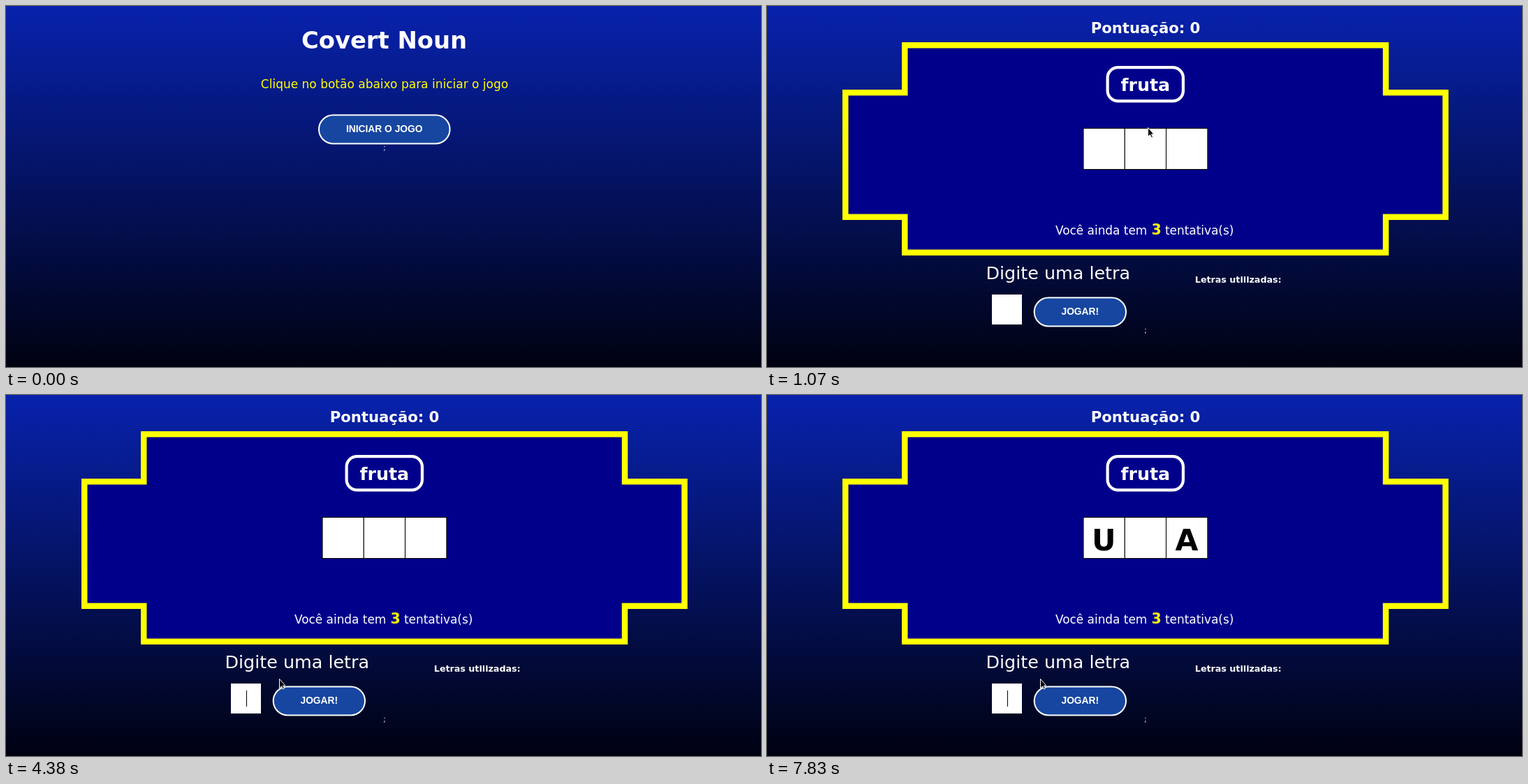
Recreate the animation shown at these times as an HTML page. Size 1081 by 518 pixels, loop 8 s.

```html
<!DOCTYPE html>
<html lang="pt">
<head>
<meta charset="utf-8">
<title>Covert Noun</title>
<style>
  html, body { margin: 0; width: 100%; height: 100%; overflow: hidden; background: #000211; }
  svg { display: block; font-family: "DejaVu Sans", Verdana, sans-serif; fill: #fff; }
  .bold { font-weight: bold; }
  .mid { text-anchor: middle; }
  .yellow { fill: #ff0; }
  .button rect { fill: #1646a0; stroke: #fff; stroke-width: 2; }
  .button text { font: bold 13.8px "Liberation Sans", Arial, sans-serif; text-anchor: middle; }
  .cells rect { stroke: #000; stroke-width: 1.1; }
  .cells text { font-size: 42.5px; fill: #000; }
  #ibeam { mix-blend-mode: difference; fill: none; stroke: #fff; }
</style>
</head>
<body>
<svg width="1081" height="518" viewBox="0 0 1081 518">
  <defs>
    <linearGradient id="sky" x2="0" y2="1">
      <stop stop-color="#0822ad"/>
      <stop offset="1" stop-color="#000211"/>
    </linearGradient>
  </defs>
  <rect width="1081" height="518" fill="url(#sky)"/>

  <g id="start">
    <text class="bold mid" x="541.5" y="61" font-size="33.8">Covert Noun</text>
    <text class="yellow mid" x="542" y="118" font-size="17">Clique no botão abaixo para iniciar o jogo</text>
    <g class="button">
      <rect id="startButton" x="448" y="156.5" width="187.5" height="41" rx="20.5"/>
      <text x="541.7" y="181">INICIAR O JOGO</text>
    </g>
    <text class="mid" x="542" y="207" font-size="10">;</text>
  </g>

  <g id="game">
    <text class="bold mid" x="542" y="39" font-size="21.2">Pontuação: 0</text>
    <path d="M197.25 56.25H886V124.25H971.5V302.75H886V353.75H197.25V302.75H112.25V124.25H197.25Z"
      fill="#00008b" stroke="#ff0" stroke-width="8.5"/>
    <rect x="487.6" y="88.1" width="108.3" height="48.3" rx="15" fill="none" stroke="#fff" stroke-width="4.2"/>
    <text class="bold mid" x="541.8" y="122" font-size="25.3">fruta</text>
    <g class="cells bold mid">
      <rect x="453" y="175.5" width="59.4" height="59"/>
      <rect x="512.2" y="175.5" width="59.4" height="59"/>
      <rect x="571.5" y="175.5" width="59.4" height="59"/>
      <text id="first" x="482.3" y="222.5">U</text>
      <text id="last" x="601" y="222.5">A</text>
    </g>
    <text x="413" y="328" font-size="16.9">Você ainda tem</text>
    <text class="bold yellow mid" x="557.7" y="328" font-size="20.4">3</text>
    <text x="570" y="328" font-size="16.9">tentativa(s)</text>
    <text x="313.5" y="392" font-size="25.4">Digite uma letra</text>
    <text class="bold" x="612.8" y="396.5" font-size="12.7">Letras utilizadas:</text>
    <rect x="322" y="414" width="43" height="43"/>
    <text id="typed" class="mid" x="344" y="443" font-size="20.8" fill="#000"
      font-family="Liberation Sans, Arial, sans-serif"></text>
    <rect id="caret" y="424" width="1" height="23" fill="#000"/>
    <g class="button">
      <rect x="382.7" y="418.5" width="131.3" height="41" rx="20.5"/>
      <text x="448.3" y="443">JOGAR!</text>
    </g>
    <text class="mid" x="542" y="469" font-size="10">;</text>
  </g>

  <g id="pointer">
    <circle id="press" r="10.5" fill="#ff0" opacity=".5"/>
    <path id="arrow" d="M.5 .5V13.5L3.5 10.8L5.5 15L7.5 14.2L5.5 10H9Z" fill="#000" stroke="#fff"/>
    <path id="hand" d="M0 1Q1.5-1 3 1V7Q5 6 6 8Q8 7 8.5 9Q10.5 8.5 10 12L9 16V19H1V17L-3 11.5Q-4 8.5 0 11Z" stroke="#000" stroke-width=".8"/>
    <path id="ibeam" d="M-3-6.5H-1L.5-5.5L2-6.5H4M.5-5.5V5.5M-3 6.5H-1L.5 5.5L2 6.5H4"/>
  </g>
</svg>
<script>
const LOOP = 8000, STEP = 68;
const get = id => document.getElementById(id);
const show = (id, on) => get(id).style.display = on ? "" : "none";
const within = (t, ...spans) => spans.some(([a, b]) => t >= a && t < b);
const clamp = v => Math.max(0, Math.min(1, v));
const ease = s => s * s * (3 - 2 * s);

// start time, step count, then start, control and end point of a curve
const moves = [
  [70, 10, 1026, 507, 800, 345, 545, 174],
  [1340, 8, 545, 174, 592, 208, 639, 228],
  [2490, 9, 639, 228, 148, 400, 351, 436],
  [3170, 1, 351, 436, 349, 437, 346, 437],
  [3380, 4, 346, 437, 362, 425, 391, 407]
];

function pointerAt(t) {
  const [start, count, x0, y0, cx, cy, x1, y1] = moves.findLast(m => m[0] <= t) || moves[0];
  const s = ease(clamp((Math.floor((t - start) / STEP) + 1) / count));
  const curve = (a, b, c) => (1 - s) ** 2 * a + 2 * s * (1 - s) * b + s * s * c;
  return [curve(x0, cx, x1), curve(y0, cy, y1)];
}

function draw(t) {
  const playing = t >= 1070;
  show("start", !playing);
  show("game", playing);

  const hover = ease(clamp((t - 546) / 264));
  const mix = (a, b) => Math.round(a + (b - a) * hover);
  get("startButton").style.fill = `rgb(${mix(22, 9)},${mix(70, 34)},${mix(160, 178)})`;

  const letter = within(t, [5370, 5900]) ? "U" : within(t, [6770, 7300]) ? "A" : "";
  get("typed").textContent = letter;
  get("caret").setAttribute("x", { U: 351, A: 350 }[letter] || 344);
  show("caret", within(t, [3310, 3850], [4380, 4920], [5370, 5840], [6440, 7240], [7830, LOOP]));
  show("first", t >= 5900);
  show("last", t >= 7300);

  const [x, y] = pointerAt(t);
  const inside = (l, r, top, bottom) => x > l && x < r && y > top && y < bottom;
  const onButton = !playing && inside(447, 636, 155, 198);
  const onText = playing && (inside(322, 365, 414, 457) || inside(316, 522, 368, 398));
  get("pointer").setAttribute("transform", `translate(${x} ${y})`);
  show("pointer", t >= 70);
  show("press", within(t, [880, 1070], [3240, 3380]));
  show("hand", onButton);
  show("ibeam", onText);
  show("arrow", !onButton && !onText);
}

const origin = performance.now();
function tick() {
  draw((performance.now() - origin) % LOOP);
  requestAnimationFrame(tick);
}
tick();
</script>
</body>
</html>
```
